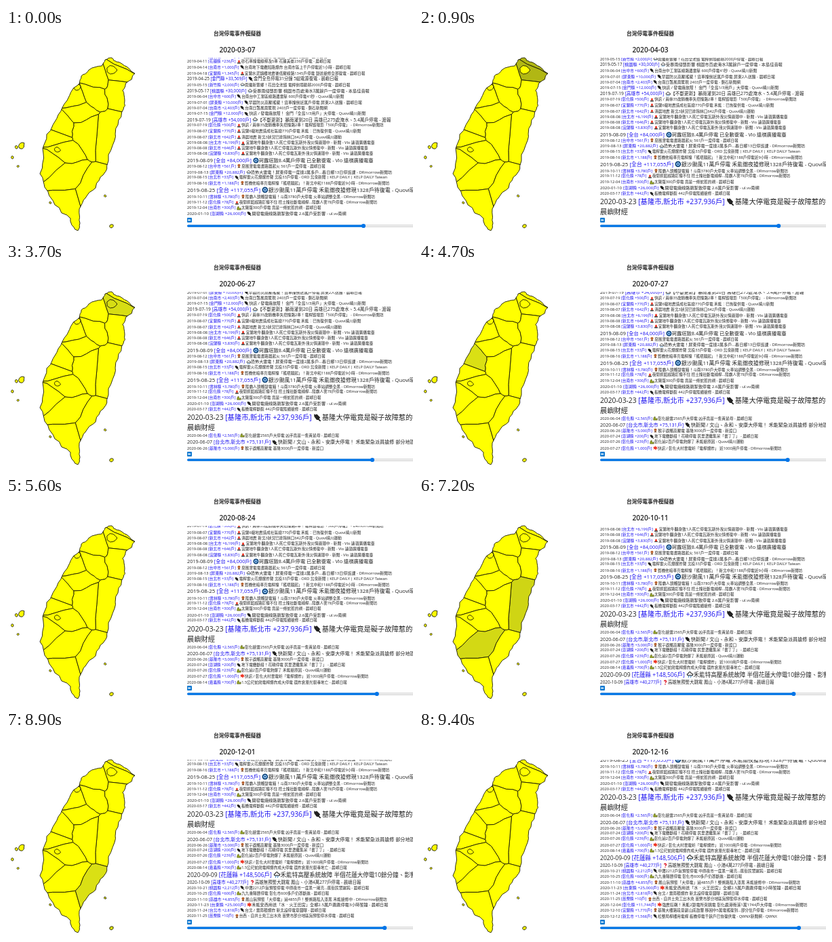
These frames come from a looping animation (600x304 px, 9500 ms). An HTML page:

```html
<!DOCTYPE html>
<html lang="zh-TW">
<head>
<meta charset="utf-8">
<title>台灣停電事件模擬器</title>
<style>
html, body { margin: 0; width: 100%; height: 100%; overflow: hidden; background: #fff; }
body { position: relative; font-family: 'Open Sans', 'Noto Sans CJK TC', 'Noto Sans CJK', sans-serif; color: #222; }
svg { display: block; }
#map { position: absolute; left: 0; top: 0; stroke: #1a1a00; stroke-width: .9; stroke-linejoin: round; }
.head { position: absolute; left: 241px; width: 200px; text-align: center; font-weight: 600; white-space: nowrap; }
#title { top: 1px; font-size: 7.8px; line-height: 14px; }
#date { top: 24px; font-size: 10.2px; line-height: 16px; }
#log { position: absolute; left: 267px; top: 44px; width: 333px; height: 235px; overflow: hidden; }
#rows { position: absolute; left: 0; bottom: 0; white-space: nowrap; }
#rows b { font-weight: 400; color: #1a10f0; }
#rows svg { display: inline-block; width: 1.22em; height: 1.22em; vertical-align: -.25em; }
#bar { position: absolute; left: 0; top: 278px; }
</style>
</head>
<body>
<svg width="0" height="0" style="position:absolute">
  <symbol id="plug" viewBox="0 0 10 10"><path d="M1 1l2 1 1-1 4 4-1 2 2 2-1 1-2-2H4L1 4z" fill="#222"/></symbol>
  <symbol id="siren" viewBox="0 0 10 10"><path d="M3 7V4q2-4 4 0v3z" fill="#e32"/><path d="M1.5 7h7v2.5h-7z" fill="#444"/></symbol>
  <symbol id="spiral" viewBox="0 0 10 10"><circle cx="5" cy="5" r="3.6" fill="#9cf" stroke="#147" stroke-width="1.8"/><circle cx="5" cy="5" r="1.2" fill="#036"/></symbol>
  <symbol id="cloud" viewBox="0 0 10 10"><path d="M2 6.5q-2-2 1-3 2-4 4 0 3 0 2 3z" fill="#eee" stroke="#222"/><path d="M4 7L3 9.5M7 7L6 9.5" stroke="#27b"/></symbol>
  <symbol id="beast" viewBox="0 0 10 10"><circle cx="5" cy="4" r="3" fill="#b63"/><path d="M2 9q3-5 6 0z" fill="#631"/></symbol>
  <symbol id="snake" viewBox="0 0 10 10"><path d="M2 3q3-3 3 1t4 1v4H1V7z" fill="#9a2" stroke="#442" stroke-width=".8"/></symbol>
  <symbol id="ask" viewBox="0 0 10 10"><path d="M3 3q2-3 4 0 0 2-2 3M5 7.5v2" fill="none" stroke="#d12" stroke-width="1.8"/></symbol>
  <symbol id="bang" viewBox="0 0 10 10"><path d="M5 0l1 3 3-1-1 3 2 2-3 0-1 3-2-3-3 1 1-3-2-2 3 0z" fill="#e32"/></symbol>
</svg>
<svg id="map" width="266" height="304">
  <clipPath id="land"><path id="shore"/></clipPath>
  <g id="cells" clip-path="url(#land)"></g>
  <use href="#shore" fill="none"/>
  <g id="isles"></g>
</svg>
<div id="title" class="head">台灣停電事件模擬器</div>
<div id="date" class="head"></div>
<div id="log"><div id="rows"></div></div>
<svg id="bar" width="600" height="26">
  <rect x="267" y="2" width="7" height="7" rx="1" fill="#0a78d0"/>
  <path d="M268.5 3.7l2 1.8-2 1.8zM270.5 3.7l2 1.8-2 1.8z" fill="#fff"/>
  <rect x="267.5" y="12.7" width="345" height="2.8" rx="1.4" fill="#efefef" stroke="#b2b2b2" stroke-width=".5"/>
  <rect id="fill" x="267" y="12.5" height="3.2" rx="1.6" fill="#0075e8"/>
  <circle id="thumb" cy="14" r="3.1" fill="#0075e8"/>
</svg>
<script>
const LOOP = 9500, STEP = 100, DAY = 864e5;
const START = Date.parse('2020-03-07');
const DAYS_PER_STEP = 3.025;
const HOLDS = [5, 7, 30, 31]; // steps that repeat the one before

const PRESS = {
  L: '晨嶼日報', F: '晨嶼財經', Y: 'Quovi晴川新聞', S: 'Quovi晴川運動', E: 'DRmorrow新聞坊',
  R: 'Vlo 遠嶺廣播電臺', C: '磐石新聞網', G: '本島佳音報', U: '渡報', N: 'ul.vv南網',
  B: 'ORD 北泉新聞 | KELP DAILY | KELP DAILY Taiwan', D: '新渡口', T: 'QWNX新聞網 - QWNX'
};

// date | place | households | icon | headline | press
const EVENTS = `
2019-03-27|台中市|1,200|plug|變電箱故障 社區停電一小時|L
2019-04-02|雲林縣|4,068|plug|西螺市區清晨停電 上班、上課大混亂|L
2019-04-11|花蓮縣|236|siren|砂石車撞電線桿及5車 花蓮美崙236戶停電|L
2019-04-14|台南市|1,000|plug|台南地下電纜短路爆炸 台南市區上千戶停電近1小時|L
2019-04-18|宜蘭縣|1,345|siren|宜蘭水泥鎮樓地震後低壓線路1345戶停電 變送搶修全部復電|L
2019-04-25|金門縣|33,569|plug|金門全島停電31分鐘 5組電源復電|L
2019-05-15|新竹縣|2,000|cloud|雨灌新豐鄉！花田全池毀 電桿倒塌砸鄰2000戶停電|L
2019-05-17|桃園縣|30,000|cloud|受暴雨侵襲影響 桃園市百處淹水3萬餘戶一度停電|G
2019-06-04|台中市|600|plug|台南台中工業區線路遭雷擊 600戶停電41秒|Y
2019-07-01|屏東縣|10,000|plug|早晨防災高壓搖擺！貨車撞倒近萬戶停電 屏東2人送醫|L
2019-07-04|台南市|2,403|plug|台南日落風雨驚現 2403戶一度停電|C
2019-07-15|金門縣|12,000|plug|快訊 / 發電廠故障！ 金門「全島1/3用戶」大停電|Y
2019-07-19|高雄市|54,000|cloud|【不斷更新】暴雨灌到20日 高雄已275處淹水、5.4萬戶停電|U
2019-07-19|彰化縣|500|siren|快訊 / 員林35歲騎機車失控撞路2車！電桿毀壞影「500戶停電」|E
2019-08-07|宜蘭縣|770|siren|宜蘭6級地震造成社區總770戶停電 禾能：已恢復供電|Y
2019-08-07|新北市|642|siren|清晨地震 新北3狀況已排除林口642戶停電|S
2019-08-08|台北市|6,199|siren|宜蘭地牛翻身致1人死亡停電瓦斯外洩災情連環中 - 新聞|R
2019-08-08|新北市|646|siren|宜蘭地牛翻身致1人死亡停電瓦斯外洩災情修復中 - 新聞|R
2019-08-08|宜蘭縣|3,830|siren|宜蘭地牛翻身致1人死亡停電瓦斯外洩災情連環中 - 新聞|R
2019-08-09|全台|84,000|spiral|珂露塔致8.4萬戶停電 已全數復電|R
2019-08-12|台中市|561|beast|惡風害電電書路器起火 561戶一度停電|L
2019-08-13|屏東縣|20,882|cloud|恐怖大雷電！屏東停電一度達2萬多戶...春日鄉13日停班課|E
2019-08-15|台北市|33|plug|電桿雷火花爆爆炸聲 北投33戶停電|B
2019-08-16|新北市|1,188|beast|賓橋他暗車亮電桿撞「搖喂蹤起」！新北中和1188戶停電近9小時|E
2019-08-25|全台|117,055|spiral|銀沙颱風11萬戶停電 禾能徹夜搶修現1328戶待復電|Y
2019-10-11|雲林縣|3,780|beast|陸霸人頭觸變電箱！斗南3780戶大停電 火車站調整全黑|E
2019-11-12|彰化縣|78|siren|夜間抓寵趕路釘撞不住 控土撞壯斷電線桿...陸霸人害78戶停電|E
2019-12-04|台南市|300|snake|太陽蛋300戶停電 竟是一條蛇惹的禍|L
2020-01-10|澎湖縣|26,000|plug|開發電廠線路跳掣致停電 2.6萬戶受影響|N
2020-03-17|新北市|442|plug|板橋電桿斷裂 442戶停電陸續搶修|L
2020-03-23|基隆市,新北市|237,936|plug|基隆大停電竟是礙子故障惹的禍|F
2020-06-04|彰化縣|2,565|snake|彰化搶雷2565戶大停電 凶手竟是一隻黃鼠母|L
2020-06-07|台北市,新北市|75,131|plug|快新聞 / 文山、永和、安康大停電！ 禾能緊急派員搶修 部分地區已復電|L
2020-06-26|基隆市|3,000|beast|猴子誤觸高壓電 基隆3000戶一度停電|D
2020-07-24|澎湖縣|200|plug|地下電纜斷措！花碩停電 民里濃攤集呆「書了了」|L
2020-07-26|彰化縣|239|snake|彰化逾2百戶停電熱爆了 禾能搶原因|S
2020-07-27|彰化縣|1,000|bang|快訊 / 彰化大村雲電昕「電桿爆炸」 近1000用戶停電|E
2020-08-14|嘉義縣|700|snake|1.5公尺蛇爬電桿爆炸成大停電 還炸倉庫光裂毒地亡|L
2020-09-09|花蓮縣|148,506|cloud|禾能特高壓系統故障 半個花蓮大停電10餘分鐘、影響14萬戶|L
2020-10-09|高雄市|40,277|ask|高雄無預警大跳電 鳳山、小港4萬277戶停電|L
2020-10-21|桃園縣|2,212|plug|中壢2212戶無預警停電 中原夜市一度黑一邊亮...逛街民眾遲鈍|L
2020-10-25|彰化縣|600|snake|九九重陽節停電 彰化市600多戶仍罩斷進|L
2020-11-10|高雄市|4,855|beast|鳳山無預警「大停電」逾4855戶！整條路陷入漆黑 禾能搶修中|E
2020-11-23|台東縣|25,000|bang|禾能安西用送「水．火王田宮」全鄉2.5萬戶跳跳停電3小時警鐘|L
2020-11-24|台北市|2,818|plug|台北 / 雷雨積爆炸 新北設停電意圖曝|L
2020-11-25|苗栗縣|10|beast|台西、自井土兇工出水兇 苗栗市部分地區無預警停水停電|L
2020-12-04|彰化縣|11,744|bang|強震狂飆！禾能2變電所突跳電 彰化鹿港衝溪1萬1744戶大停電|E
2020-12-10|宜蘭縣|1,770|beast|基隆大樓路段意副山底鼓響 移困中5萬電搖復到...部分住戶停電|E
2020-12-12|新北市|1,568|plug|松整局桿樓用電桿 板橋停電千餘戶已恢復供電|T`
  .trim().split('\n').map(line => {
    const [date, place, count, icon, text, press] = line.split('|');
    return { date, place, count, icon, text, press, n: +count.replace(',', ''), time: Date.parse(date) };
  });

// A few capes and bays, clockwise from the northwest.
const SHORE = `122,62 141,56 146,47 156,44 163,50 178,57 190,67 177,81 172,92 175,107 173,120 165,143 160,166
  151,196 143,217 132,236 117,251 108,267 109,288 106,299 99,293 95,281 72,261 57,235 50,215 55,185 60,157
  77,128 90,107 105,85 111,71`.split(/\s+/).map(p => p.split(',').map(Number));

// Each county is the land nearest to its centre.
const CENTRES = '基隆市 176 51,新北市 168 66,桃園縣 131 76,新竹縣 126 96,苗栗縣 104 104,台中市 108 121,' +
  '宜蘭縣 166 90,花蓮縣 152 152,南投縣 118 150,彰化縣 80 146,雲林縣 74 161,嘉義縣 78 180,台南市 66 200,' +
  '高雄市 84 220,屏東縣 88 258,台東縣 126 246';
// Enclosed cities and islands: centre and radius.
const CITIES = '台北市 157 62 7,新竹市 106 87 5,嘉義市 76 180 4';
const ISLES = '澎湖縣 23 173 4.5,澎湖縣 15 176 2,澎湖縣 9 191 1.8,澎湖縣 18 204 1.5,' +
  '台東縣 146 248 1.5,台東縣 156 292 2.8,屏東縣 65 258 1.4';

const parse = list => list.split(',').map(s => s.split(' ')).map(([name, ...v]) => ({ name, v: v.map(Number) }));
const $ = id => document.getElementById(id);

// Bend edges at their middles; symmetric in both ends, so neighbours still fit.
function rough(ring, times = 2) {
  if (!times) return ring;
  return rough(ring.flatMap((p, i) => {
    const q = ring[(i + 1) % ring.length], sx = p[0] + q[0], sy = p[1] + q[1];
    const amp = Math.min(1.8, Math.hypot(p[0] - q[0], p[1] - q[1]) / 9);
    return [p, [sx / 2 + amp * Math.sin(sx * 12.9 + sy * 7.8), sy / 2 + amp * Math.sin(sx * 3.7 + sy * 5.1)]];
  }), times - 1);
}

const toPath = ring => 'M' + ring.map(p => p.map(v => v.toFixed(1)).join(' ')).join('L') + 'Z';

// Keep the part of a ring that is nearer to a than to b.
function nearer(ring, a, b) {
  const side = p => (p[0] - (a[0] + b[0]) / 2) * (b[0] - a[0]) + (p[1] - (a[1] + b[1]) / 2) * (b[1] - a[1]);
  return ring.flatMap((p, i) => {
    const q = ring[(i + 1) % ring.length], s = side(p), t = side(q);
    const keep = s <= 0 ? [p] : [];
    if (s * t < 0) keep.push(p.map((v, k) => v + (q[k] - v) * s / (s - t)));
    return keep;
  });
}

function blob([x, y, r]) {
  return Array.from({ length: 9 }, (_, i) => {
    const a = i * Math.PI * 2 / 9, d = r * (1 + .25 * Math.sin(i * 5.3 + x));
    return [x + d * Math.cos(a), y + d * Math.sin(a)];
  });
}

const shapes = [];
function addShape(layer, name, ring) {
  const node = document.createElementNS('http://www.w3.org/2000/svg', 'path');
  node.setAttribute('d', toPath(ring));
  $(layer).append(node);
  shapes.push({ name, node });
}

$('shore').setAttribute('d', toPath(rough(SHORE)));
const centres = parse(CENTRES);
for (const c of centres) {
  const box = [[-99, -99], [400, -99], [400, 400], [-99, 400]];
  const cell = centres.reduce((ring, o) => o === c ? ring : nearer(ring, c.v, o.v), box);
  addShape('cells', c.name, rough(cell));
}
for (const c of parse(CITIES)) addShape('cells', c.name, blob(c.v));
for (const c of parse(ISLES)) addShape('isles', c.name, blob(c.v));

for (const e of EVENTS) {
  const size = 5.65 + 1.95e-5 * e.n;
  const gap = e.press === 'F' ? ' -<br>' : ' - ';
  e.row = document.createElement('div');
  e.row.style.cssText = `font-size:${size}px;line-height:${size * 1.53 - .8}px`;
  e.row.innerHTML = `${e.date} <b>[${e.place} +${e.count}戶]</b> <svg><use href="#${e.icon}"/></svg>${e.text}${gap}${PRESS[e.press]}`;
  $('rows').append(e.row);
}

function draw(step) {
  while (HOLDS.includes(step)) step--;
  const days = Math.floor(step * DAYS_PER_STEP + .62), now = START + days * DAY, load = {};
  for (const e of EVENTS) {
    e.row.style.display = e.time <= now ? '' : 'none';
    const left = e.n - 3000 * (now - e.time) / DAY;
    if (e.time > now || left <= 0) continue;
    for (const c of e.place.split(',')) load[c] = Math.max(load[c] || 0, left);
  }
  for (const { name, node } of shapes) {
    const v = load[name] ? Math.round(224 - load[name] / 5000) : 255;
    node.setAttribute('fill', `rgb(${v - (v < 255 ? 6 : 0)},${v},${v < 255 ? 20 : 0})`);
  }
  $('date').textContent = new Date(now).toISOString().slice(0, 10);
  const x = 527 + days * .116;
  $('thumb').setAttribute('cx', x);
  $('fill').setAttribute('width', x - 267);
}

let shown = -1;
const begin = performance.now();
function tick() {
  const step = Math.floor((performance.now() - begin) % LOOP / STEP);
  if (step !== shown) draw(shown = step);
  requestAnimationFrame(tick);
}
tick();
</script>
</body>
</html>
```
